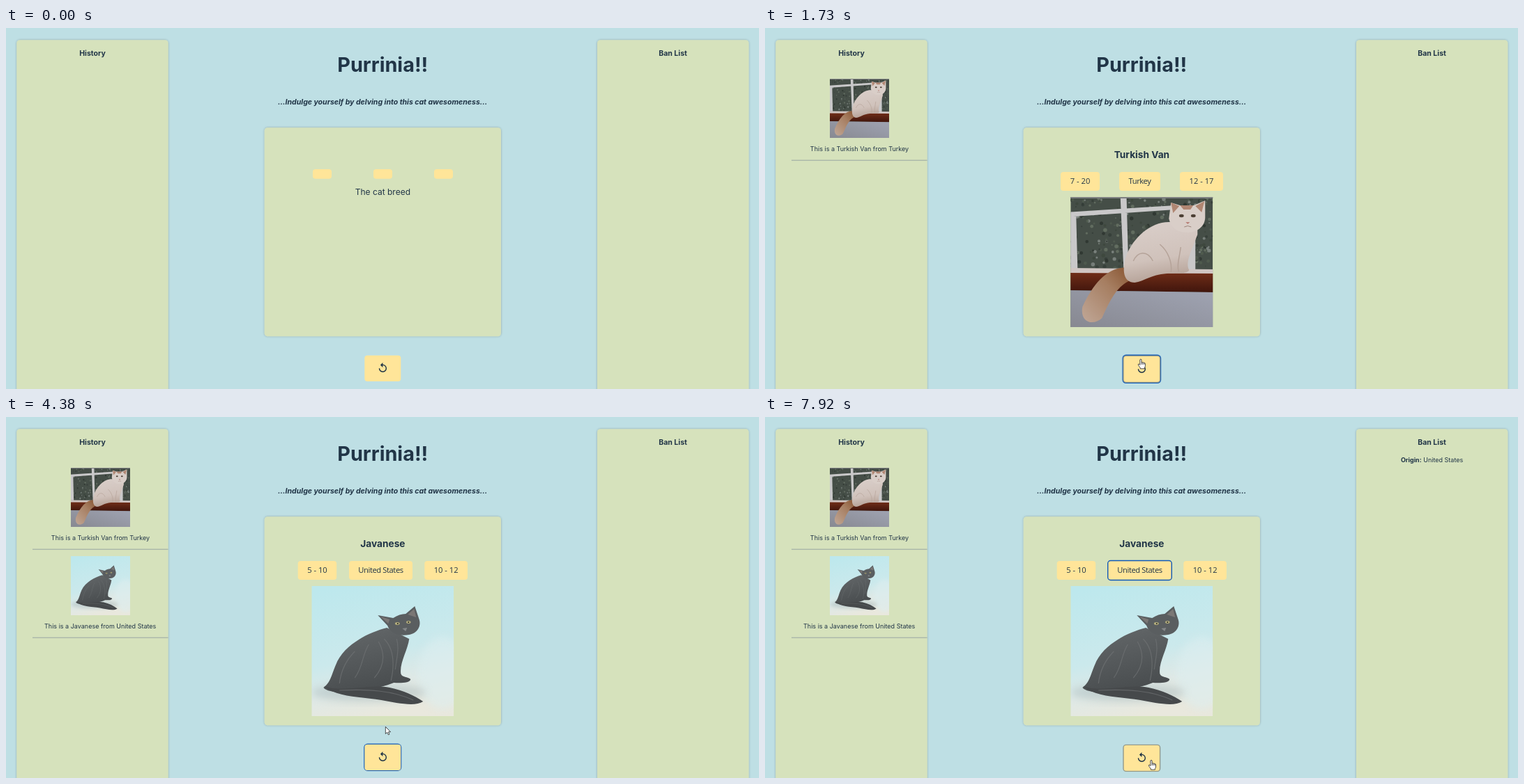
Write an HTML page that moves like this. It is 1080x519 px and loops after 7990 ms.

```html
<!DOCTYPE html>
<html lang="en">
<head>
<meta charset="utf-8">
<title>Purrinia</title>
<style>
  html, body { margin: 0; width: 100%; height: 100%; overflow: hidden; background: #bedfe4; }
  svg.stage { display: block; width: 100vw; height: 100vh; }
  text { font-family: Inter, sans-serif; font-size: 9px; fill: #213547; text-anchor: middle; }
  .b { font-weight: 700; }
  .h3 { font-size: 10.53px; font-weight: 700; }
  .h2 { font-size: 13.7px; font-weight: 700; }
  .alt { font-size: 12px; }
  .start { text-anchor: start; }
  .chip { font-family: "Open Sans", sans-serif; font-size: 11.2px; font-weight: 500; }
  .tight { letter-spacing: -.4px; }
  .panel { fill: #d6e2bc; filter: url(#shadow); }
</style>
</head>
<body>
<svg class="stage" viewBox="0 0 1080 519" preserveAspectRatio="none">
  <defs>
    <filter id="shadow" x="-5%" y="-5%" width="110%" height="110%">
      <feDropShadow dx="0" dy="0" stdDeviation="1.8" flood-color="#000" flood-opacity=".28"/>
    </filter>
    <filter id="soft"><feGaussianBlur stdDeviation=".7"/></filter>
    <filter id="haze" x="-30%" y="-30%" width="160%" height="160%"><feGaussianBlur stdDeviation="6"/></filter>
    <linearGradient id="wall" x1="0" y1="1" x2="1" y2="0">
      <stop offset="0" stop-color="#84858d"/><stop offset="1" stop-color="#a0a4b3"/>
    </linearGradient>
    <linearGradient id="sill" x1="0" y1="0" x2="0" y2="1">
      <stop offset="0" stop-color="#6f2d18"/><stop offset="1" stop-color="#40150c"/>
    </linearGradient>
    <linearGradient id="brush" x1="1" y1="0" x2="0" y2="1">
      <stop offset="0" stop-color="#85502c"/><stop offset=".4" stop-color="#a67e61"/><stop offset="1" stop-color="#c0a797"/>
    </linearGradient>
    <linearGradient id="white" x1=".4" y1="0" x2=".6" y2="1">
      <stop offset="0" stop-color="#d9cec9"/><stop offset=".6" stop-color="#d0c2bb"/><stop offset="1" stop-color="#b19d92"/>
    </linearGradient>
    <linearGradient id="studio" x1=".2" y1="0" x2=".45" y2="1">
      <stop offset="0" stop-color="#bde8ed"/><stop offset=".55" stop-color="#cbe9ec"/>
      <stop offset=".78" stop-color="#dfe9e6"/><stop offset="1" stop-color="#e9e8dd"/>
    </linearGradient>
    <linearGradient id="smoke" x1="0" y1="0" x2=".3" y2="1">
      <stop offset="0" stop-color="#65696b"/><stop offset="1" stop-color="#4a4e50"/>
    </linearGradient>

    <symbol id="van" viewBox="0 0 204 187" preserveAspectRatio="none">
      <rect width="204" height="187" fill="#454e47"/>
      <g id="leaves"></g>
      <g filter="url(#soft)">
        <path d="M-9 22L150 12V18L-9 29ZM71 -9H80L83 103H76ZM-9 28H8L10 103H-9ZM166 50H179V106H166Z" fill="#c9c8c9"/>
        <path d="M-9 -9H213V2H-9Z" fill="#7d7f81"/>
        <path d="M-9 102L213 104V112H-9Z" fill="#d0c6c3"/>
        <path d="M-9 109L213 110V137L-9 134Z" fill="url(#sill)"/>
        <path d="M-9 134L213 137V199H-9Z" fill="url(#wall)"/>
        <path d="M84 102C56 98 34 121 17 158C13 180 32 186 45 174C56 150 66 126 90 118Z" fill="url(#brush)"/>
        <path d="M144 36C116 34 90 58 80 84C73 106 76 123 92 123C106 121 114 112 138 110C150 109 168 111 170 105C164 94 174 76 182 54L182 35Z" fill="url(#white)"/>
        <path d="M128 68C140 78 146 94 144 108M158 72C156 88 152 98 155 107M90 92C96 78 110 76 118 92" fill="none" stroke="#b5a399" stroke-width="1.5"/>
        <path d="M141 31L144 8L157 12H177L193 5L193 30C192 44 180 51 167 51S144 45 141 31Z" fill="#d9cec8"/>
        <path d="M144 8L156 13L147 23ZM192 6L179 13L188 22ZM157 12L176 12L172 18L162 18Z" fill="#b08672"/>
        <ellipse cx="159" cy="27" rx="3.4" ry="2.2" fill="#4d4035"/>
        <ellipse cx="176" cy="27" rx="3.4" ry="2.2" fill="#4d4035"/>
        <path d="M165 36H171L168 39Z" fill="#b98078"/>
        <path d="M163 43Q168 40 173 43" fill="none" stroke="#9b8178"/>
      </g>
    </symbol>

    <symbol id="java" viewBox="0 0 204 187" preserveAspectRatio="none">
      <rect width="204" height="187" fill="url(#studio)"/>
      <ellipse cx="188" cy="125" rx="36" ry="52" fill="#dceef0" opacity=".6" filter="url(#haze)"/>
      <ellipse cx="82" cy="153" rx="82" ry="13" fill="#a9b9bb" opacity=".5" filter="url(#haze)"/>
      <g filter="url(#soft)">
        <path d="M108 60C84 66 50 82 37 108C28 128 28 138 17 146C24 155 52 153 74 150C90 148 108 143 118 139C128 140 142 139 142 134C138 130 130 132 128 126C126 110 138 92 140 76Z" fill="url(#smoke)"/>
        <path d="M18 144C45 154 82 140 112 146C132 150 148 158 160 166C148 174 122 168 100 164C70 159 36 160 18 144Z" fill="#46494b"/>
        <path d="M95 42L117 46C123 42 129 40 135 40L148 29L154 47C158 57 152 68 140 70C124 73 112 67 109 57Z" fill="#5a5e60"/>
        <path d="M99 44L112 48L110 54ZM138 41L147 33L150 45Z" fill="#7b7775"/>
        <path d="M104 76C116 88 120 108 114 136M96 80C106 98 104 116 90 132M62 94C50 106 42 122 40 140M82 84C72 100 74 116 62 132M122 76C126 90 122 104 120 120M40 150C80 148 116 150 146 164" fill="none" stroke="#727677" stroke-width="1.2" opacity=".65"/>
        <ellipse cx="123" cy="54" rx="3.4" ry="1.9" fill="#b7b07d"/>
        <ellipse cx="139" cy="52" rx="3.2" ry="1.9" fill="#b7b07d"/>
        <circle cx="123.5" cy="54" r="1" fill="#222"/>
        <circle cx="139" cy="52" r="1" fill="#222"/>
        <path d="M130 61L137 60L135 65Z" fill="#85888a"/>
      </g>
    </symbol>
  </defs>

  <rect width="1080" height="519" fill="#bedfe4"/>
  <rect class="panel" x="15.3" y="17.3" width="217.4" height="540" rx="4.5"/>
  <rect class="panel" x="848" y="17.3" width="217.4" height="540" rx="4.5"/>
  <rect class="panel" x="370.7" y="143.2" width="339.3" height="300" rx="4.5"/>
  <text class="h3" x="124" y="39.5">History</text>
  <text class="h3" x="956.6" y="39.5">Ban List</text>
  <text class="b" x="540.3" y="63.2" style="font-size:28.8px">Purrinia!!</text>
  <text class="h3" x="540.2" y="110.4" font-style="italic">...Indulge yourself by delving into this cat awesomeness...</text>

  <g id="past1">
    <text x="135.5" y="177.2">This is a Turkish Van from Turkey</text>
    <path d="M38 190.2H232.6" stroke="#98a6a2"/>
  </g>
  <text id="alt1" class="start" x="95" y="84.2">My cat</text>
  <use id="thumb1" href="#van" x="93" y="73" width="85" height="85"/>
  <g id="past2">
    <text x="135.2" y="304">This is a Javanese from United States</text>
    <path d="M38 317.2H232.6" stroke="#98a6a2"/>
  </g>
  <text id="alt2" class="start" x="95" y="211.2">My cat</text>
  <use id="thumb2" href="#java" x="93" y="200" width="85" height="85"/>
  <text id="ban" x="956.6" y="65.2"><tspan class="b">Origin:</tspan> United States</text>

  <text id="name" class="h2" x="540.4"></text>
  <g id="chips"></g>
  <text id="altMain" class="alt" x="540.4">The cat breed</text>
  <use id="photo" x="438.3" width="204" height="187"/>

  <g id="reset">
    <rect id="ring"/>
    <rect id="face" fill="#ffe599"/>
    <path id="icon" fill="#213547" d="M12 5V1L7 6l5 5V7c3.31 0 6 2.69 6 6s-2.69 6-6 6-6-2.69-6-6H4c0 4.42 3.58 8 8 8s8-3.58 8-8-3.58-8-8-8z"/>
  </g>

  <g id="cursor" stroke="#222" stroke-width=".8" stroke-linejoin="round" fill="#fff">
    <path id="arrow" d="M0 0V10.2L2.4 8.1L4 11.6L5.6 10.9L4.1 7.5H7.2Z"/>
    <path id="hand" d="M-1.1 1Q0 -.6 1.1 1V5Q2 4.1 3 5.2Q4 4.5 5 5.7Q6.4 5.4 6.5 7V10Q6.2 12 5.4 12.6V14H-.6V12.8Q-2.4 10.6 -3.7 8.2Q-3.6 6.6 -2.2 7.4L-1.1 8.6ZM1.1 5V8M3 5.4V8M5 6V8"/>
  </g>
</svg>

<script>
const LOOP = 7990;
const NS = "http://www.w3.org/2000/svg";
const $ = id => document.getElementById(id);
const set = (el, attrs) => { for (const k in attrs) el.setAttribute(k, attrs[k]); return el; };
const add = (parent, tag, attrs) => parent.appendChild(set(document.createElementNS(NS, tag), attrs));
const show = (id, on) => set($(id), { visibility: on ? "visible" : "hidden" });
const box = (x1, y1, x2, y2) => ({ x: x1, y: y1, width: x2 - x1, height: y2 - y1 });
const BLUE = "#1059b8", GREY = "#939a8b";

// Foliage behind the window
let seed = 7;
const rnd = () => (seed = seed * 16807 % 2147483647) / 2147483647;
const greens = ["#2b332d", "#525d50", "#687366", "#858d89", "#343c38", "#3c463d"];
for (let i = 0; i < 380; i++) {
  add($("leaves"), "circle", {
    cx: (rnd() * 204).toFixed(1), cy: (rnd() * 104).toFixed(1),
    r: (.8 + rnd() * 2).toFixed(1), fill: greens[i % greens.length], opacity: .8
  });
}

const chips = [0, 1, 2].map(i => ({
  rect: add($("chips"), "rect", { rx: 4, fill: "#ffe599" }),
  label: add($("chips"), "text", { class: i === 1 ? "chip tight" : "chip" })
}));

const cards = {
  empty: { name: "", spans: [[440, 467], [527, 554], [614, 641]], labels: ["", "", ""] },
  van: { name: "Turkish Van", spans: [[424, 480], [508, 567], [595, 657]], labels: ["7 - 20", "Turkey", "12 - 17"] },
  java: { name: "Javanese", spans: [[418.7, 474.2], [492, 583], [600.3, 662]], labels: ["5 - 10", "United States", "10 - 12"] }
};

// Pointer visits: [time, x, y]
const visits = [
  [[170, 731, 515], [240, 724, 470], [380, 680, 437], [620, 600, 462], [930, 548, 489.5],
   [1620, 548, 489.5], [1900, 525, 455], [2280, 490, 404], [2420, 485, 384], [2520, 487, 392],
   [2900, 542, 505], [3040, 542, 505], [3180, 543, 496.5], [4180, 543, 496.5],
   [4480, 545, 420], [4930, 548, 262], [5100, 547, 238], [5350, 545, 222],
   [6170, 545, 222], [6330, 544, 330], [6570, 540, 521]],
  [[7380, 546, 514], [7520, 549, 502], [7920, 554, 493], [LOOP, 554, 493]]
];

function pointer(t) {
  const path = visits.find(v => t >= v[0][0] && t < v[v.length - 1][0]);
  if (!path) return null;
  const i = path.findIndex(p => p[0] > t);
  const [t0, x0, y0] = path[i - 1], [t1, x1, y1] = path[i];
  const k = (t - t0) / (t1 - t0);
  return { x: x0 + (x1 - x0) * k, y: y0 + (y1 - y0) * k };
}

const inside = (p, x1, y1, x2, y2) => !!p && p.x >= x1 && p.x <= x2 && p.y >= y1 && p.y <= y2;

function drawCard(t, hover, focus) {
  const empty = t < 1460;
  const card = empty ? cards.empty : t < 3720 ? cards.van : cards.java;
  const grow = hover ? 1 : 0;
  $("name").textContent = card.name;
  set($("name"), { y: 186.8 - grow * .7 });
  chips.forEach(({ rect, label }, i) => {
    let [a, b] = card.spans[i];
    if (i === 0) { a -= grow * .6; b -= grow * .3; }
    if (i === 2) { a += grow * .3; b += grow * .6; }
    const [top, bottom] = empty ? [203, 216.7] : [207 - grow, 234 + grow];
    const lit = i === 1 && (hover || focus);
    const pad = lit ? .3 : 0;
    const fit = lit && !hover ? .4 : 0;
    set(rect, {
      ...box(a - pad, top + pad - fit * 2, b + pad, bottom - pad + fit * 2),
      stroke: lit ? (focus ? BLUE : GREY) : "none",
      "stroke-width": focus && hover ? 1.9 : 1.4
    });
    label.textContent = card.labels[i];
    set(label, { x: (a + b) / 2, y: 224.3 });
  });
  show("altMain", t < 1600);
  set($("altMain"), { y: empty ? 239.7 : 256.6 });
  show("photo", t >= 1660);
  set($("photo"), { href: t < 4180 ? "#van" : "#java", y: 243 + grow });
}

function drawReset(hover, focus) {
  const face = hover ? box(514, 471.4, 566.6, 509.4) : box(514.3, 470.7, 566.3, 507.9);
  set($("face"), { ...face, rx: 4, stroke: hover ? GREY : "none", "stroke-width": 1.4 });
  set($("ring"), {
    ...(hover ? box(512.4, 469.6, 568.2, 511) : box(513.2, 469.6, 567.3, 508.9)),
    rx: 5.5, fill: BLUE, visibility: focus ? "visible" : "hidden"
  });
  set($("icon"), { transform: `translate(532 ${hover ? 481.2 : 480.2}) scale(.7)` });
}

function draw(t) {
  const p = pointer(t);
  const onReset = inside(p, 514, 471, 566, 508);
  const onOrigin = t > 5000 && inside(p, 491, 206, 583, 235);
  const picked = t >= 6160;

  drawCard(t, onOrigin, picked);
  drawReset(onReset, t >= 1000 && !picked);

  show("past1", t >= 1460);
  show("alt1", t >= 1460 && t < 1600);
  show("thumb1", t >= 1660);
  show("past2", t >= 3720);
  show("alt2", t >= 3720 && t < 4180);
  show("thumb2", t >= 4180);
  show("ban", picked);

  const hand = onReset || (t > 930 && t < 3200);
  show("arrow", p && !hand);
  show("hand", p && hand);
  if (p) set($("cursor"), { transform: `translate(${p.x.toFixed(2)} ${p.y.toFixed(2)})` });
}

const begin = performance.now();
function tick() {
  draw((performance.now() - begin) % LOOP);
  requestAnimationFrame(tick);
}
tick();
</script>
</body>
</html>
```
